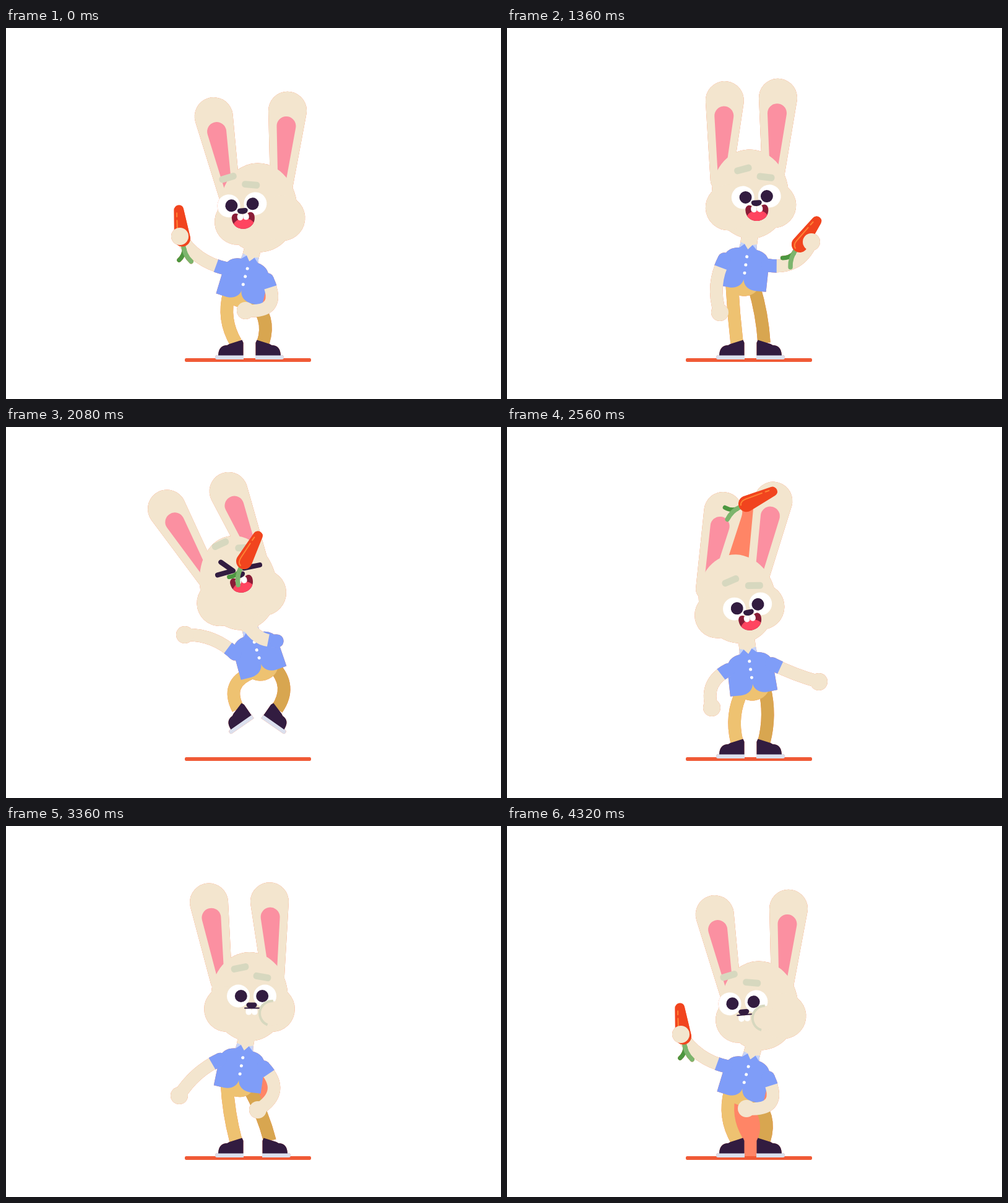
Recreate the animation shown at these times as an HTML page with a canvas. Size 800x600 px, loop 4.36 s.

```html
<!DOCTYPE html>
<html lang="en">
<head>
<meta charset="utf-8">
<title>Rabbit with a carrot</title>
<style>
html, body { margin: 0; width: 100%; height: 100%; overflow: hidden; background: #fff; }
canvas { display: block; }
</style>
</head>
<body>
<canvas id="stage" width="800" height="600"></canvas>
<script>
const LOOP = 4360, STEP = 40, DANCE = LOOP - STEP, RAD = Math.PI / 180;
const SKIN = '#f3e5ce', DARK = '#321c40', BLUE = '#7f9df8', PALE = '#c5d3f8',
  PINK = '#fb90a1', BROW = '#d7d8bf', TAN = '#eec271', BROWN = '#d8a650',
  CORAL = '#ff8566', SOLE = '#dbe0ee', RED = '#f1441e';
const TOSS = 560, CATCH = 960, THROW = 2000, EAT = 2860, REFILL = 4040;
const REACH = 92, LEG = 98, EAR = 129;

// head and body: x, y, tilt; gaze: face offset; ears: angles; hands: x, y, arm bend
const poses = [
  { t: 0, head: [408.5, 290.5, -5], gaze: [-26.5, -7], ears: [-11.3, 4.6],
    body: [393.5, 376.5, 15], left: [281, 337, -18], right: [387, 457, -53] },
  { t: 640, head: [381.5, 289, 10], gaze: [7, -7], ears: [-4.9, -5.2],
    body: [388, 373, -14], left: [421, 356, 42], right: [516, 370, 15] },
  { t: 1360, head: [393, 268.5, -3], gaze: [9.5, 5], ears: [2.5, 3.5],
    body: [389.5, 357, 8], left: [344, 460, 18], right: [492, 346, 31] },
  { t: 2080, head: [376, 257, -13.5], gaze: [6, -27], ears: [-30.7, -21.8],
    body: [397.5, 335.5, -17], left: [289, 336, 18], right: [390, 318, -18] },
  { t: 2560, head: [372, 278, -11], gaze: [14, 15], ears: [12, 11.3],
    body: [390, 366, -8], left: [331, 454, 28], right: [504, 412, 4] },
  { t: 3360, head: [393.5, 276, 0], gaze: [3.5, -1], ears: [-8.9, -2.7],
    body: [385, 362, 10], left: [280, 436, 13], right: [407, 459, -43] }
];

const stage = document.getElementById('stage').getContext('2d');
const layer = document.createElement('canvas');
layer.width = 800;
layer.height = 600;
const c = layer.getContext('2d');

const clamp = u => Math.max(0, Math.min(1, u));
const ramp = (t, a, b) => {
  const u = clamp((t - a) / (b - a));
  return u * u * (3 - 2 * u);
};
const hump = u => Math.sin(Math.PI * clamp(u)) ** 2;
const dist = (a, b) => Math.hypot(a[0] - b[0], a[1] - b[1]);

function local([x, y, deg], px, py) {
  const s = Math.sin(deg * RAD), k = Math.cos(deg * RAD);
  return [x + px * k - py * s, y + px * s + py * k];
}

// Control point of a limb that bows sideways by the given amount.
function bow(a, b, bend) {
  const d = dist(a, b) || 1;
  return [(a[0] + b[0]) / 2 - (b[1] - a[1]) / d * bend,
    (a[1] + b[1]) / 2 + (b[0] - a[0]) / d * bend];
}

// Hands swing out and down on the way between poses, within arm's reach.
function makeArm(body, [x, y, bend], side, swing) {
  const from = local(body, side * 35.5, 22);
  const aim = [x + side * 70 * swing, y + 25 * swing];
  const k = Math.min(1, REACH / dist(from, aim));
  const to = from.map((v, i) => v + (aim[i] - v) * k);
  return { from, to, bend: bow(from, to, bend) };
}

function makeLeg(body, side, lift, step) {
  const from = local(body, side * 18, 59);
  const to = [393.5 + side * 22 + lift * (13 + side * 9.5) + step, 509 - 53 * lift];
  const bend = bow(from, to, -side * Math.max(0, LEG - dist(from, to)));
  return { from, to, bend, turn: side * 35 * lift };
}

function carrotAt(t, left, right) {
  if (t < TOSS || t >= REFILL) {
    const wind = t < TOSS ? ramp(t, 200, TOSS) : 0;
    return [left[0] + 4, left[1] + 3.5, -97 + 139 * wind];
  }
  if (t < CATCH) {
    const u = (t - TOSS) / (CATCH - TOSS);
    return [411 + 86 * u, 345 + 27 * u - 630 * u * (1 - u), 42 + 264 * u];
  }
  if (t < THROW) return [right[0] - 19, right[1] + 4, 306];
  const u = (t - 1960) / 840;
  return [384.5 + 3.5 * u, 317 - 55 * u - 752 * u * (1 - u), 289 + 64 * u];
}

function poseAt(t) {
  let i = poses.length - 1;
  while (poses[i].t > t) i--;
  const a = poses[i], b = poses[(i + 1) % poses.length];
  const end = b.t || DANCE, u = (t - a.t) / (end - a.t), e = ramp(t, a.t, end);
  const mix = name => a[name].map((v, k) => v + (b[name][k] - v) * e);
  const swing = hump(u), lift = hump((t - 1880) / 400);
  const head = mix('head'), body = mix('body');
  head[1] += 8 * swing;
  body[1] += 8 * swing;
  const ears = mix('ears').map((deg, k) => {
    const base = local(head, k ? 38.5 : -45.5, -25);
    return { base, tip: local([...base, deg], 0, -EAR), deg };
  });
  const arms = [makeArm(body, mix('left'), -1, swing), makeArm(body, mix('right'), 1, swing)];
  const step = 11 * (ramp(t, 2960, 3120) - ramp(t, 3960, 4120));
  const legs = [makeLeg(body, -1, lift, 0), makeLeg(body, 1, lift, step)];
  const carrot = carrotAt(t, arms[0].to, arms[1].to);
  return { t, head, body, ears, arms, legs, carrot, lift, gaze: mix('gaze') };
}

function fill(color, path) {
  c.fillStyle = color;
  c.beginPath();
  path();
  c.fill();
}

function stroke(color, width, cap, path) {
  c.strokeStyle = color;
  c.lineWidth = width;
  c.lineCap = cap;
  c.lineJoin = 'round';
  c.beginPath();
  path();
  c.stroke();
}

function disc(color, x, y, r) {
  fill(color, () => c.arc(x, y, r, 0, 7));
}

function poly(...points) {
  for (const p of points) c.lineTo(...p);
}

function placed([x, y, deg], draw, sx = 1, sy = sx) {
  c.save();
  c.translate(x, y);
  c.rotate(deg * RAD);
  c.scale(sx, sy);
  draw();
  c.restore();
}

// Tapered capsule along the x axis.
function taper(color, len, r0, r1) {
  const a = Math.acos((r0 - r1) / len);
  fill(color, () => {
    c.arc(0, 0, r0, a, 2 * Math.PI - a);
    c.arc(len, 0, r1, -a, a);
  });
}

function limb({ from, bend, to }) {
  c.lineTo(...from);
  c.quadraticCurveTo(...bend, ...to);
}

function ear({ tip, deg }) {
  placed([...tip, deg + 90], () => {
    taper(SKIN, EAR, 31, 17.5);
    c.translate(25, 0);
    taper(PINK, EAR - 25, 15.5, 5);
  });
}

function shoe({ to, turn }, side) {
  placed([...to, turn], () => {
    fill(SOLE, () => c.roundRect(-33.5, 20, 46, 7, [4, 0, 0, 3]));
    fill(DARK, () => {
      c.moveTo(-28.5, 20.5);
      c.bezierCurveTo(-28, 9, -23, 4, -14, 4);
      poly([-10.5, 2], [10, -4.5], [12, 0], [12, 20.5]);
    });
  }, -side, 1);
}

function arm({ from, bend, to }) {
  stroke(SKIN, 20.5, 'butt', () => limb({ from, bend, to }));
  const u = Math.min(0.5, 7.5 / dist(from, bend));
  const mid = (a, b) => a.map((v, i) => v + (b[i] - v) * u);
  const near = mid(from, bend);
  stroke(BLUE, 21.5, 'butt', () => limb({ from, bend: near, to: mid(near, mid(bend, to)) }));
  disc(BLUE, ...from, 10.7);
}

function shirt() {
  for (const d of [-1, 1]) {
    fill(PALE, () => poly([15 * d, 3], [13 * d, -9], [6 * d, -7], [4 * d, 3]));
    fill(BLUE, () => {
      poly([-d, 50], [-d, 1], [0, 1], [6.5 * d, -7], [14 * d, 0]);
      c.quadraticCurveTo(33 * d, 2, 37 * d, 18);
      poly([38.5 * d, 65], [21 * d, 66]);
      c.bezierCurveTo(9 * d, 66, d, 59, 0, 50);
    });
  }
  for (let i = 0; i < 3; i++) disc('#fff', 0, 13 + i * 13.3, 2.5);
}

function openMouth() {
  c.save();
  fill('#8a1c37', () => {
    c.moveTo(-18.5, 21);
    c.bezierCurveTo(-18.5, 11, -8, 11, -6, 18);
    c.lineTo(6, 18);
    c.bezierCurveTo(8, 11, 18.5, 11, 18.5, 21);
    c.bezierCurveTo(18.5, 45, -18.5, 45, -18.5, 21);
  });
  c.clip();
  fill('#ff4560', () => c.ellipse(0, 34, 17, 12, 0, 0, 7));
  c.restore();
}

function teeth(y) {
  for (const x of [-9.5, 0]) fill('#fff', () => c.roundRect(x, y, 9.5, 11, 4.5));
}

function face(shut, chewing) {
  for (const d of [-1, 1]) {
    if (shut) {
      stroke(DARK, 8, 'round', () => poly([35 * d, 2], [9 * d, 1], [25 * d, -17]));
    } else {
      disc('#fff', 21.5 * d, 0, 18.5);
      disc(DARK, 17.2 * d, 0, 10);
    }
  }
  if (chewing) {
    teeth(19.5);
    stroke(DARK, 2, 'round', () => poly([-11, 19.5], [12, 19.5]));
    disc(SKIN, 33, 28, 20);
    stroke(BROW, 4, 'butt', () => c.arc(33, 28, 20, 1.95, 4.8));
  } else {
    openMouth();
    teeth(14);
  }
  const y = chewing ? 10.5 : 5.5;
  fill(DARK, () => {
    c.moveTo(-4, y);
    c.lineTo(4, y);
    c.bezierCurveTo(11, y, 10, y + 9.5, 0, y + 9.5);
    c.bezierCurveTo(-10, y + 9.5, -11, y, -4, y);
  });
  const brow = () => fill(BROW, () => c.roundRect(-14.5, -5.5, 29, 11, 5));
  placed([-19, -45.5, -12], brow);
  placed([17, -31, 10], brow);
}

function carrot() {
  stroke('#4c9740', 7, 'round', () => limb({ from: [-18, 1], bend: [-28, -1], to: [-34, -9.5] }));
  stroke('#7cb56d', 7.5, 'round', () => limb({ from: [-10, 0], bend: [-27, 0], to: [-38.5, 9.5] }));
  taper(RED, 46.5, 13, 7.8);
  stroke('#ff8535', 2, 'round', () => {
    limb({ from: [-9, -2], bend: [-7, -8], to: [2, -7.5] });
    c.lineTo(30, -5);
    c.moveTo(36, -4.5);
    c.lineTo(42, -3.8);
  });
}

// Nearly closed spaces between the limbs show a coral backdrop.
function gaps({ t, body, head, ears, arms, legs, carrot }) {
  arms.forEach((a, i) => {
    for (const anchor of [legs[i].from, local(body, 0, -20)]) {
      if (dist(a.to, anchor) < 50) fill(CORAL, () => { limb(a); poly(anchor); });
    }
  });
  const [x, y] = carrot, [l, r] = ears;
  const between = Math.abs(x - (l.tip[0] + r.tip[0]) / 2) < 10 && y < head[1] - 100;
  if (t >= THROW && t < EAT && between && y > l.tip[1] - 20) {
    fill(CORAL, () => poly([x - 7, y + 4], [x + 12, y + 4], r.base, l.base));
  }
  if (t >= 4240) {
    fill(CORAL, () => {
      limb(legs[0]);
      poly([383, 537], [404, 537], legs[1].to);
      c.quadraticCurveTo(...legs[1].bend, ...legs[1].from);
    });
  }
}

function figure(p) {
  const { t, head, body, ears, arms, legs } = p;
  stroke(BROWN, 20.5, 'butt', () => limb(legs[1]));
  placed(body, () => fill(TAN, () => c.ellipse(0, 56, 26, 21, 0, 0, 7)));
  stroke(TAN, 20.5, 'butt', () => limb(legs[0]));
  shoe(legs[0], -1);
  shoe(legs[1], 1);
  ears.forEach(ear);

  placed(body, () => {
    fill(SKIN, () => c.rect(-13.5, -40, 27, 46));
    shirt();
  });

  placed(head, () => {
    fill(SKIN, () => {
      c.ellipse(0, 0, 62, 72 + 10 * p.lift, 0, Math.PI, 2 * Math.PI);
      c.ellipse(0, 0, 62, 72, 0, 0, Math.PI);
    });
    disc(SKIN, -36.3, 20, 37);
    disc(SKIN, 36.3, 20, 37);
    c.translate(...p.gaze);
    face(t >= 1880 && t < 2280, t >= EAT);
  });

  arms.forEach(arm);
  if (t < EAT || t >= REFILL) {
    placed(p.carrot, carrot, t < REFILL ? 1 - 0.7 * ramp(t, EAT - 100, EAT) : 1);
  }
  for (const a of arms) disc(SKIN, ...a.to, 14);
}

function render(t) {
  const p = poseAt(Math.min(t, DANCE - 0.01));
  c.clearRect(0, 0, 800, 600);
  gaps(p);
  stroke('#f05a36', 6, 'round', () => poly([292, 537], [490, 537]));
  figure(p);

  stage.fillStyle = '#fff';
  stage.fillRect(0, 0, 800, 600);
  stage.shadowColor = '#ff7448';
  stage.shadowBlur = 1.5;
  stage.drawImage(layer, 0, 0);
  stage.shadowBlur = 0;
  stage.shadowColor = 'transparent';
}

let start;
function tick(now) {
  if (start === undefined) start = now;
  render(Math.floor((now - start) % LOOP / STEP) * STEP);
  requestAnimationFrame(tick);
}
render(0);
requestAnimationFrame(tick);
</script>
</body>
</html>
```
